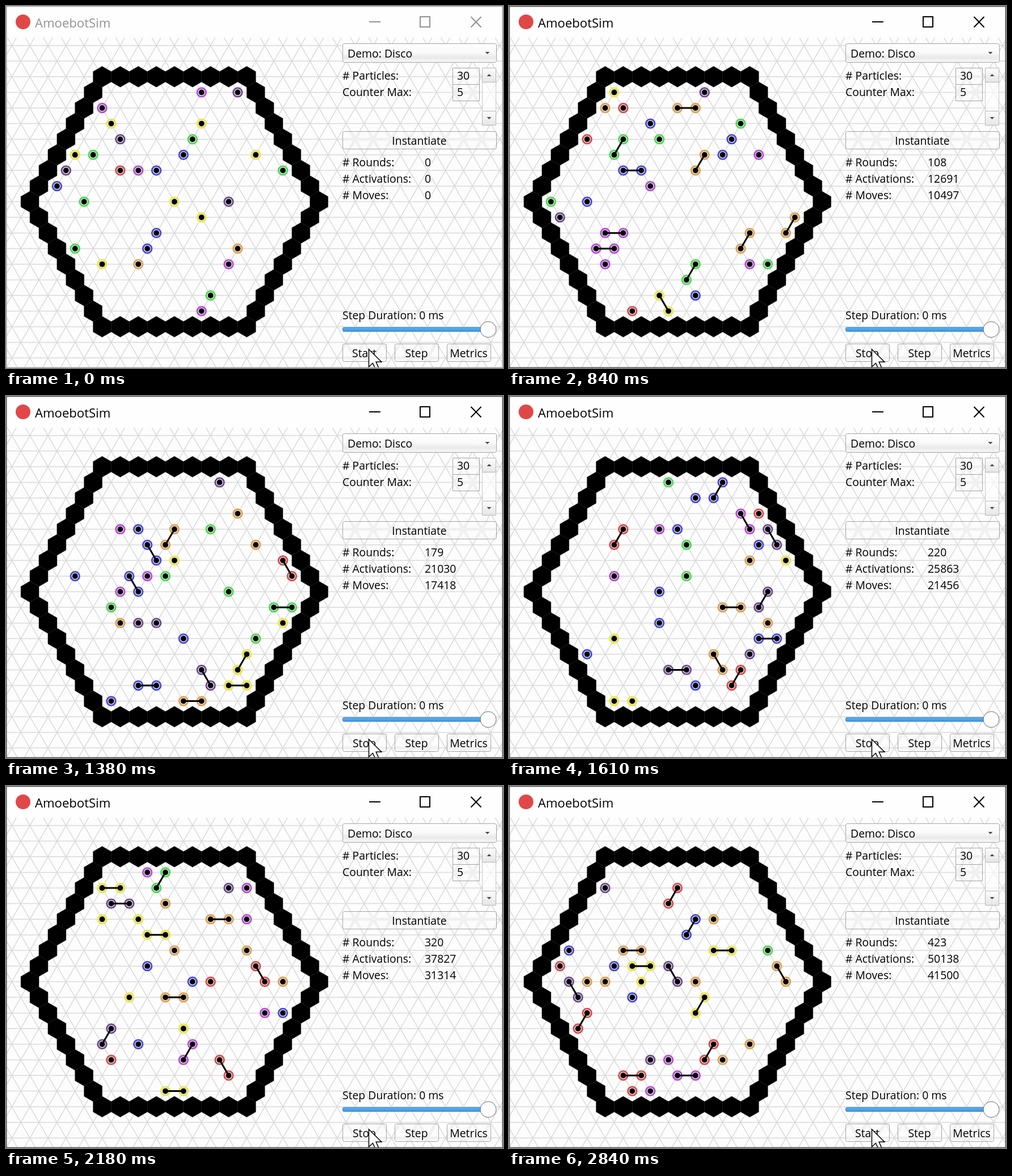
Write an HTML page with a canvas that moves like this. It is 876 by 639 pixels and loops after 3.15 s.

```html
<!DOCTYPE html>
<html lang="en">
<head>
<meta charset="utf-8">
<title>AmoebotSim</title>
<style>
  html, body { margin: 0; width: 100%; height: 100%; overflow: hidden; background: #fdfdfd; }
  canvas { display: block; }
</style>
</head>
<body>
<canvas id="stage" width="876" height="639"></canvas>
<script>
const ctx = document.getElementById('stage').getContext('2d');
const LOOP = 3150, STEP = 70;
const PARTICLES = 30, COUNTER_MAX = 5, RADIUS = 8;
const CELL = 31.85, ROW = CELL * Math.sqrt(3) / 2;
const RED = '#e04848';
const COLORS = [RED, '#e3a04c', '#ebe93f', '#44df48', '#4747df', '#6f4796', '#bd47e0'];
const DIRS = [[2, 0], [1, 1], [-1, 1], [-2, 0], [-1, -1], [1, -1]];

// Counter readings: time, rounds, activations, moves.
const READINGS = [
  [190, 0, 0, 0],
  [440, 41, 4773, 3960],
  [840, 108, 12691, 10497],
  [1120, 149, 17406, 14389],
  [1610, 220, 25863, 21456],
  [2180, 320, 37827, 31314],
  [2840, 423, 50138, 41500]
];

let seed = 11;
function random(n) {
  seed = (Math.imul(seed, 1664525) + 1013904223) >>> 0;
  return Math.floor(seed / 4294967296 * n);
}
const randomColor = () => COLORS[random(COLORS.length)];

function headOf({ i, j, dir }) {
  return dir < 0 ? [i, j] : [i + DIRS[dir][0], j + DIRS[dir][1]];
}

// Cells are counted in half columns i and rows j from the centre.
function isFree(pose, i, j) {
  if (Math.abs(j) >= RADIUS || Math.abs(i) + Math.abs(j) >= 2 * RADIUS) return false;
  return !pose.some(p => {
    const [hi, hj] = headOf(p);
    return (p.i === i && p.j === j) || (hi === i && hj === j);
  });
}

function scatter() {
  const pose = [];
  while (pose.length < PARTICLES) {
    const j = random(2 * RADIUS) - RADIUS;
    const i = 2 * (random(2 * RADIUS) - RADIUS) + Math.abs(j % 2);
    if (isFree(pose, i, j)) {
      pose.push({ i, j, dir: -1, color: randomColor(), counter: COUNTER_MAX });
    }
  }
  return pose;
}

// One activation: contract, or expand at random and count down to a new colour.
function activate(pose) {
  const p = pose[random(pose.length)];
  if (p.dir >= 0) {
    [p.i, p.j] = headOf(p);
    p.dir = -1;
    return;
  }
  const dir = random(6);
  if (isFree(pose, p.i + DIRS[dir][0], p.j + DIRS[dir][1])) p.dir = dir;
  if (--p.counter === 0) {
    p.counter = COUNTER_MAX;
    p.color = randomColor();
  }
}

function buildFrames() {
  const pose = scatter();
  const list = [];
  let done = 0;
  function add(time, counts, active, running) {
    for (; done < counts[1]; done++) activate(pose);
    list.push({ time, counts, active, running, pose: pose.map(p => ({ ...p })) });
  }

  add(0, [0, 0, 0], false, false);
  add(120, [0, 0, 0], true, false);
  READINGS.slice(1).forEach(([end, ...to], k) => {
    const [start, ...from] = READINGS[k];
    const steps = Math.ceil((end - start) / STEP);
    for (let s = 0; s < steps; s++) {
      const counts = from.map((v, c) => Math.round(v + (to[c] - v) * s / steps));
      add(start + s * STEP, counts, true, true);
    }
  });
  const [end, ...total] = READINGS.at(-1);
  add(end, total, true, false);
  return list;
}
const frames = buildFrames();

const place = (i, j) => [296.9 + i * CELL / 2, 345.5 + j * ROW];

function paint({ fill, stroke, width = 1 }) {
  if (fill) { ctx.fillStyle = fill; ctx.fill(); }
  if (stroke) { ctx.strokeStyle = stroke; ctx.lineWidth = width; ctx.stroke(); }
}

function path(points, style) {
  ctx.beginPath();
  points.forEach(p => ctx.lineTo(...p));
  if (style.close) ctx.closePath();
  paint(style);
}

function disc(x, y, r, style) {
  ctx.beginPath();
  ctx.arc(x, y, r, 0, 7);
  paint(style);
}

function box(x, y, w, h, { radius = 3, stroke = '#a3a3a3', fill }) {
  ctx.beginPath();
  ctx.roundRect(x + .5, y + .5, w, h, radius);
  paint({ fill, stroke });
}

function text(str, x, y, { size = 19.4, weight = 500, color = '#000', align = 'left' } = {}) {
  ctx.font = `${weight} ${size}px "Open Sans", "Noto Sans", sans-serif`;
  ctx.fillStyle = color;
  ctx.textAlign = align;
  ctx.fillText(str, x, y);
}

function shade(top, bottom, ...colors) {
  const g = ctx.createLinearGradient(0, top, 0, bottom);
  colors.forEach((color, k) => g.addColorStop(k / (colors.length - 1), color));
  return g;
}

function arrow(x, y, up) {
  const d = up ? -2 : 2;
  path([[x - 4, y - d], [x + 4, y - d], [x, y + d]], { fill: '#4a4a4a' });
}

function drawGrid(line) {
  for (let j = -10; j <= 10; j++) path([place(-20, j), place(40, j)], line);
  for (let i = -32; i <= 50; i += 2) {
    path([place(i - 12, -12), place(i + 12, 12)], line);
    path([place(i + 12, -12), place(i - 12, 12)], line);
  }
}

// A see-through control: the grid behind it looks wide and pale.
function glass(x, y, w, h, radius) {
  ctx.save();
  ctx.beginPath();
  ctx.rect(x, y, w, h);
  ctx.clip();
  ctx.fillStyle = '#fcfcfc';
  ctx.fillRect(x, y, w, h);
  drawGrid({ stroke: '#f0f0f0', width: 5 });
  ctx.restore();
  box(x, y, w, h, { radius });
}

function drawWall() {
  const r = CELL / Math.sqrt(3);
  const hexagon = (i, j) => {
    const [x, y] = place(i, j);
    const corners = DIRS.map((_, k) =>
      [x + r * Math.sin(k * Math.PI / 3), y + r * Math.cos(k * Math.PI / 3)]);
    path(corners, { fill: '#000', stroke: '#141414', width: .5, close: true });
  };
  for (let j = -RADIUS; j <= RADIUS; j++) {
    const edge = 2 * RADIUS - Math.abs(j);
    const step = Math.abs(j) === RADIUS ? 2 : 2 * edge;
    for (let i = -edge; i <= edge; i += step) hexagon(i, j);
  }
}

function drawParticle(p) {
  const tail = place(p.i, p.j), head = place(...headOf(p));
  const ends = p.dir < 0 ? [tail] : [tail, head];
  ends.forEach(([x, y]) => disc(x, y, 7.8, { fill: '#e0e0e0', stroke: p.color, width: 2.8 }));
  path([tail, head], { stroke: '#000', width: 3 });
  ends.forEach(([x, y]) => disc(x, y, 4.9, { fill: '#000' }));
}

function drawTitleBar(active) {
  const color = active ? '#000' : '#929292';
  const line = { stroke: color, width: 2 };
  ctx.fillStyle = '#fefefe';
  ctx.fillRect(0, 0, 876, 56);
  disc(30, 28, 13, { fill: RED });
  text('AmoebotSim', 51, 37.5, { size: 22.1, weight: 400, color });
  path([[640, 28], [660, 28]], line);
  path([[730, 19], [747, 19], [747, 37], [730, 37]], { ...line, close: true });
  path([[819.5, 19], [837.5, 37.5]], line);
  path([[837.5, 19], [819.5, 37.5]], line);
}

function button(label, x, y, w) {
  glass(x, y, w, 31, 3);
  text(label, x + w / 2, y + 23.5, { align: 'center' });
}

function drawPanel({ counts, running }) {
  box(593, 66, 271, 33, { fill: shade(66, 99, '#fefefe', '#fcfcfc', '#fafafa', '#e9e9e9', '#f8f8f8') });
  text('Demo: Disco', 602, 91);
  arrow(848.5, 83, false);

  [['# Particles:', PARTICLES], ['Counter Max:', COUNTER_MAX]].forEach(([label, value], k) => {
    text(label, 593, 130 + 29 * k);
    glass(787, 109 + 29 * k, 47, 29, 0);
    text(value, 795, 130 + 29 * k);
  });

  box(839, 109, 24, 101, { fill: '#ffffffa0', stroke: '#c8c8c8', radius: 0 });
  [109, 185].forEach((top, k) => {
    box(839, top, 24, 25, { fill: shade(top, top + 25, '#fdfdfd', '#e6e6e6'), stroke: '#b4b4b4', radius: 1 });
    arrow(851.5, top + 13, k === 0);
  });

  button('Instantiate', 593, 221, 271);
  ['# Rounds:', '# Activations:', '# Moves:'].forEach((label, k) => {
    text(label, 593, 283 + 29 * k);
    text(counts[k], 738, 283 + 29 * k);
  });

  text('Step Duration: 0 ms', 593, 553);
  box(593, 567, 257, 7, { fill: shade(567, 574, '#62b4f2', '#3c98e4'), stroke: '#3a86c4', radius: 2 });
  disc(850, 571, 14, { fill: '#fefefe', stroke: '#6c6c6c' });
  [running ? 'Stop' : 'Start', 'Step', 'Metrics'].forEach((label, k) => button(label, 593 + 92 * k, 596, 77));
}

function drawCursor() {
  const outline = [[0, 0], [0, 31], [7, 24.5], [12, 35.5], [17.5, 33], [12.7, 22.3], [22.3, 22.3]];
  path(outline.map(([x, y]) => [x + 639.5, y + 606]),
    { fill: '#fff', stroke: '#000', width: 1.5, close: true });
}

function draw(frame) {
  ctx.fillStyle = '#fdfdfd';
  ctx.fillRect(0, 0, 876, 639);
  drawGrid({ stroke: '#dadada', width: 1.5 });
  drawWall();
  frame.pose.forEach(drawParticle);
  drawTitleBar(frame.active);
  drawPanel(frame);
  drawCursor();
  ctx.strokeStyle = frame.active ? '#5c5c5c' : '#a6a6a6';
  ctx.lineWidth = 1.5;
  ctx.strokeRect(.75, .75, 874.5, 637.5);
}

function tick() {
  const t = performance.now() % LOOP;
  draw(frames.findLast(f => f.time <= t));
  requestAnimationFrame(tick);
}
tick();
</script>
</body>
</html>
```
